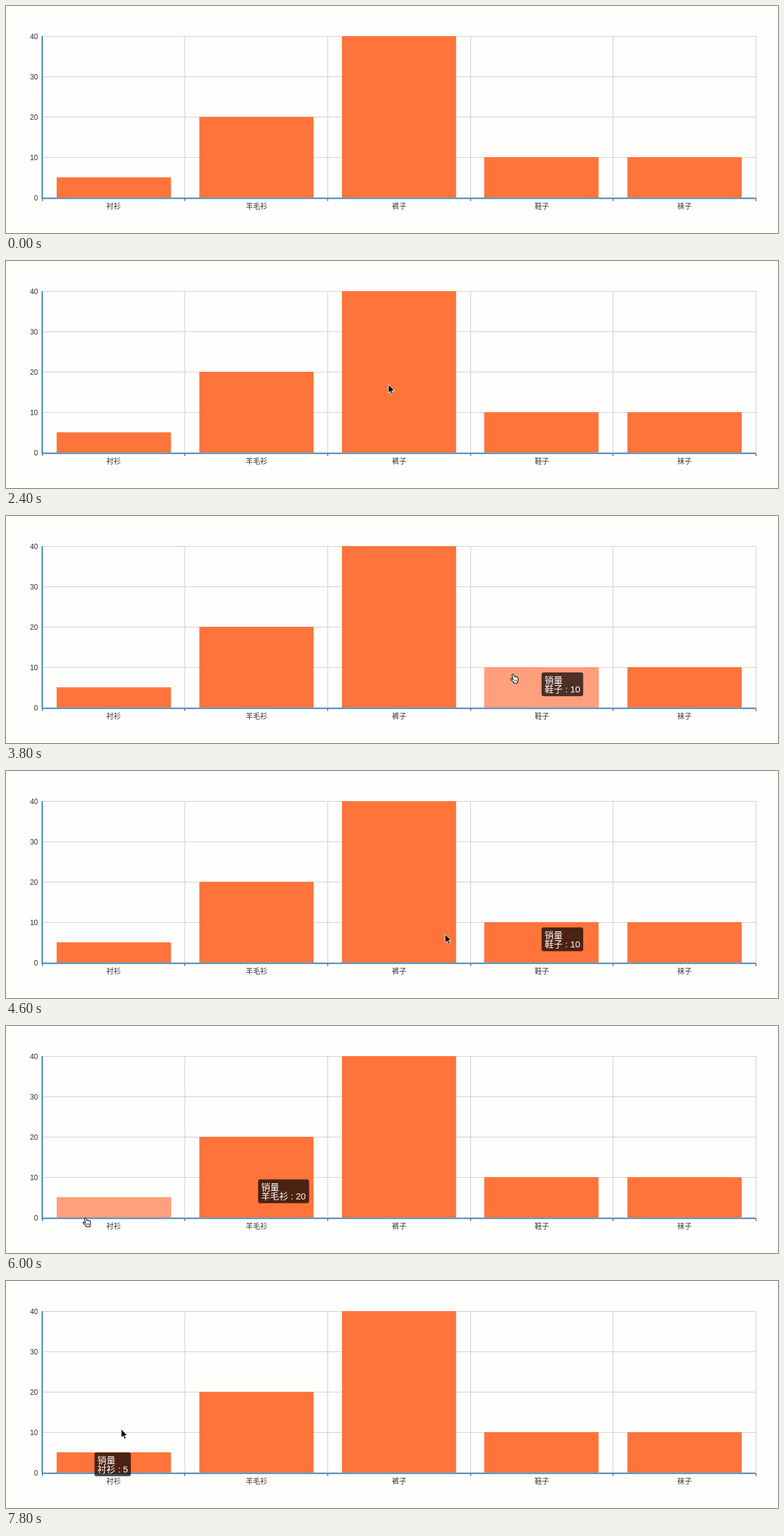
An HTML page for the animation above (8000 ms loop, 1280 by 377 pixels).

```html
<!DOCTYPE html>
<html lang="zh-CN">
<head>
<meta charset="utf-8">
<title>销量</title>
<style>
html, body { margin: 0; width: 100%; height: 100%; overflow: hidden; background: #fefefd; }
svg { display: block; width: 1280px; height: 377px; }
text { font-family: "Liberation Sans", "Noto Sans CJK SC", "Noto Sans CJK", sans-serif; }
.axis text { font-size: 12px; fill: #333; }
.x { text-anchor: middle; }
.y { text-anchor: end; }
.bars { fill: #ff743a; }
.lit { fill: #ff9f7c; }
.tip rect { fill: rgba(0, 0, 0, .7); }
.tip text { font-size: 15px; font-weight: 500; fill: #fff; white-space: pre; }

.lit, .tip, .arrow, .hand { opacity: 0; animation: 8s step-end infinite; }
.cursor { animation: move 8s infinite; }
.arrow { animation-name: arrow; }
.hand { animation-name: hand; }
.lit.shirt { animation-name: litShirt; }
.lit.sweater { animation-name: litSweater; }
.lit.trousers { animation-name: litTrousers; }
.lit.shoes { animation-name: litShoes; }
.tip.shirt { animation-name: tipShirt; }
.tip.sweater { animation-name: tipSweater; }
.tip.trousers { animation-name: tipTrousers; }
.tip.shoes { animation-name: tipShoes; }

/* The pointer is sampled every 200 ms, which is 2.5% of the loop. */
@keyframes move {
  0% { transform: translate(790px, 372px); animation-timing-function: step-end; }
  7.5% { transform: translate(790px, 366px); animation-timing-function: steps(5); }
  20% { transform: translate(764px, 290px); animation-timing-function: steps(3); }
  27.5% { transform: translate(759px, 225px); animation-timing-function: step-end; }
  30% { transform: translate(634px, 205px); animation-timing-function: step-end; }
  32.5% { transform: translate(648px, 178px); animation-timing-function: steps(4); }
  42.5% { transform: translate(739px, 237px); animation-timing-function: step-end; }
  45% { transform: translate(770px, 238px); animation-timing-function: step-end; }
  47.5% { transform: translate(840px, 262px); animation-timing-function: steps(3); }
  55% { transform: translate(872px, 268px); animation-timing-function: step-end; }
  57.5% { transform: translate(728px, 271px); animation-timing-function: step-end; }
  60% { transform: translate(538px, 264px); animation-timing-function: step-end; }
  62.5% { transform: translate(400px, 240px); animation-timing-function: steps(2); }
  67.5% { transform: translate(383px, 259px); animation-timing-function: steps(2); }
  72.5% { transform: translate(290px, 300px); animation-timing-function: step-end; }
  75% { transform: translate(131px, 318px); animation-timing-function: steps(7); }
  92.5% { transform: translate(180px, 288px); animation-timing-function: step-end; }
  95% { transform: translate(189px, 246px); animation-timing-function: step-end; }
  97.5%, 100% { transform: translate(191px, 246px); }
}
@keyframes arrow {
  0%, 32.5%, 47.5%, 62.5%, 75% { opacity: 0; }
  7.5%, 45%, 57.5%, 72.5%, 95%, 100% { opacity: 1; }
}
@keyframes hand {
  0%, 45%, 57.5%, 72.5%, 95%, 100% { opacity: 0; }
  32.5%, 47.5%, 62.5%, 75% { opacity: 1; }
}
@keyframes litTrousers { 32.5% { opacity: 1; } 45% { opacity: 0; } }
@keyframes litShoes { 47.5% { opacity: 1; } 57.5% { opacity: 0; } }
@keyframes litSweater { 62.5% { opacity: 1; } 72.5% { opacity: 0; } }
@keyframes litShirt { 75% { opacity: 1; } 95% { opacity: 0; } }
@keyframes tipTrousers { 32.5% { opacity: 1; } 47.5% { opacity: 0; } }
@keyframes tipShoes { 47.5% { opacity: 1; } 60% { opacity: 0; } }
@keyframes tipSweater { 62.5% { opacity: 1; } 77.5% { opacity: 0; } }
@keyframes tipShirt { 77.5%, 100% { opacity: 1; } }
</style>
</head>
<body>
<svg viewBox="0 0 1280 377">
  <path fill="none" stroke="#ccc" d="M60 50.5H1243M60 117.5H1243M60 184.5H1243M60 251.5H1243M60 318.5H1243
    M296.5 50V318M533.5 50V318M770.5 50V318M1006.5 50V318M1243.5 50V318"/>
  <path fill="none" stroke="#333" d="M60.5 320V324M296.5 320V324M533.5 320V324M770.5 320V324M1006.5 320V324M1243.5 320V324"/>
  <path fill="none" stroke="#3a84b5" stroke-width="2" d="M60 50V320.5M59 319.5H1244"/>

  <g class="axis">
    <g class="y">
      <text x="53" y="54.5">40</text>
      <text x="53" y="121.5">30</text>
      <text x="53" y="188.5">20</text>
      <text x="53" y="255.5">10</text>
      <text x="53" y="322.5">0</text>
    </g>
    <g class="x">
      <text x="178.5" y="337">衬衫</text>
      <text x="415.5" y="337">羊毛衫</text>
      <text x="652" y="337">裤子</text>
      <text x="888.5" y="337">鞋子</text>
      <text x="1125" y="337">袜子</text>
    </g>
  </g>

  <g class="bars">
    <rect x="84" y="284.5" width="189.5" height="33.5"/>
    <rect x="320.5" y="184" width="189.5" height="134"/>
    <rect x="557" y="50" width="189.3" height="268"/>
    <rect x="793" y="251" width="189.5" height="67"/>
    <rect x="1030.3" y="251" width="189.5" height="67"/>
  </g>
  <rect class="lit shirt" x="84" y="284.5" width="189.5" height="33.5"/>
  <rect class="lit sweater" x="320.5" y="184" width="189.5" height="134"/>
  <rect class="lit trousers" x="557" y="50" width="189.3" height="268"/>
  <rect class="lit shoes" x="793" y="251" width="189.5" height="67"/>

  <g class="tip trousers" transform="translate(667 187)">
    <rect width="69" height="40" rx="4"/>
    <text x="5" y="18">销量</text><text x="5" y="33">裤子 : 40</text>
  </g>
  <g class="tip shoes" transform="translate(888 259.5)">
    <rect width="69" height="40" rx="4"/>
    <text x="5" y="18">销量</text><text x="5" y="33">鞋子 : 10</text>
  </g>
  <g class="tip sweater" transform="translate(418 254.5)">
    <rect width="84.5" height="40" rx="4"/>
    <text x="5" y="18">销量</text><text x="5" y="33">羊毛衫 : 20</text>
  </g>
  <g class="tip shirt" transform="translate(146.5 284.5)">
    <rect width="60.5" height="40" rx="4"/>
    <text x="5" y="18">销量</text><text x="5" y="33">衬衫 : 5</text>
  </g>

  <g class="cursor">
    <path class="arrow" stroke="#fff" stroke-linejoin="round"
      d="M0 0V14.2L3.2 11.3L5.5 16.4L7.9 15.4L5.7 10.4H10.2Z"/>
    <g class="hand" fill="#fff" stroke="#000" stroke-width="1.1" stroke-linejoin="round">
      <path d="M.6 8.4L-.9 2.8Q-1.2 1 0 .7Q1.2.5 1.8 1.9L3.3 5Q4.4 4.2 5.2 5.2Q6.4 4.6 7 5.7
        Q8.6 5.4 9 7Q9.8 10 8.6 12.5L8.3 15.5H2L1.4 13.6L-2.6 9.8Q-3.8 8.4 -2.6 7.8Q-1.4 7.4 .6 9.6Z"/>
      <path stroke-width=".7" d="M2.8 9.5V13M4.8 9.5V13M6.7 9.5V13"/>
    </g>
  </g>
</svg>
</body>
</html>
```
